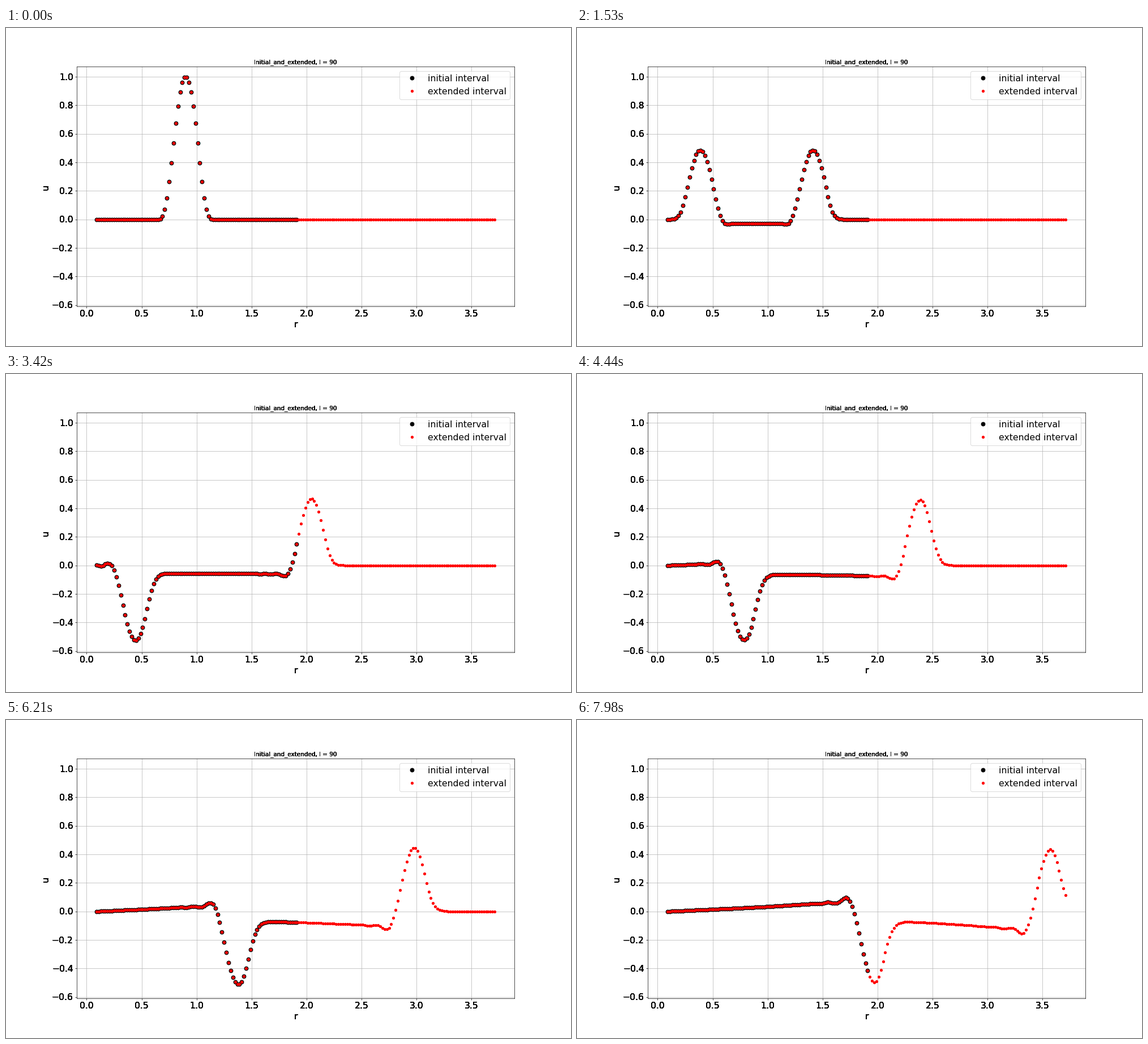
Write a matplotlib script that moves like this. It is 998 px wide and 561 px high and loops after 8 s.

```python
import numpy as np
import matplotlib.pyplot as plt
from matplotlib.animation import FuncAnimation

W, H, DPI = 998, 561, 64
K = W / 16 / DPI            # scales point sizes of a 16-inch-wide figure
STEPS, LOOP_MS = 267, 8000
N_INIT, N_EXT = 92, 182     # points on the two intervals
STEP_R, STEP_T = 0.02, 0.01

plt.rcParams.update({
    "font.family": "DejaVu Sans", "font.size": 18 * K,
    "axes.linewidth": 0.8 * K, "grid.linewidth": 0.8 * K,
    "lines.markeredgewidth": K, "patch.linewidth": K,
})


def bump(r, mid=0.9, half=0.3):
    """Smooth pulse that vanishes outside mid +/- half."""
    d2 = (r - mid) ** 2
    gap = half ** 2 - d2
    inside = gap > 1e-9
    return np.where(inside, np.exp(-4 * d2 / np.where(inside, gap, 1)), 0)


def accel(u):
    """Right side of u_tt = u_rr - u."""
    a = np.zeros_like(u)
    a[1:-1] = (u[2:] - 2 * u[1:-1] + u[:-2]) / STEP_R ** 2 - u[1:-1]
    return a


def solve(r):
    """Leapfrog history with u = 0 halfway between the first two points."""
    old = bump(r)
    new = old + STEP_T ** 2 / 2 * accel(old)
    history = [old]
    for _ in range(STEPS - 1):
        new[0] = -new[1]
        history.append(new)
        old, new = new, 2 * new - old + STEP_T ** 2 * accel(new)
    return history


r = 0.09 + STEP_R * np.arange(300)
waves = solve(r)

fig = plt.figure(figsize=(W / DPI, H / DPI), dpi=DPI, facecolor="white")
LEFT, RIGHT, TOP, BOTTOM = 124.75, 898.2, 67.8, 490.8
ax = fig.add_axes([LEFT / W, 1 - BOTTOM / H, (RIGHT - LEFT) / W, (BOTTOM - TOP) / H])
X0, X1, Y0, Y1 = -0.091, 3.891, -0.609, 1.073
ax.set(xlim=(X0, X1), ylim=(Y0, Y1))
ax.set_axisbelow(True)
ax.grid(True, color="#b0b0b0")


def stamp(x, y, text, size=18, **kw):
    """Heavy text: the same string printed several times at a pixel."""
    for _ in range(5):
        fig.text(x / W, 1 - y / H, text, size=size * K, va="baseline", **kw)


x_ticks = np.arange(8) * 0.5
y_ticks = np.arange(-3, 6) * 0.2
ax.set_xticks(x_ticks)
ax.set_yticks(y_ticks)
ax.tick_params(length=3.5 * K, width=0.8 * K, labelbottom=False, labelleft=False)
for v in x_ticks:
    stamp(LEFT + (v - X0) / (X1 - X0) * (RIGHT - LEFT), 509, f"{v:.1f}", ha="center")
for v in y_ticks:
    y = BOTTOM - (v - Y0) / (Y1 - Y0) * (BOTTOM - TOP)
    stamp(118.7, y + 5.7, f"{v:.1f}".replace("-", "\u2212"), ha="right")

stamp(511.5, 63, "Initial_and_extended, I = 90", size=12, ha="center")
stamp(511.5, 528, "r", ha="center")
stamp(75, 280.5, "u", ha="center", rotation=90, rotation_mode="anchor")

inner, = ax.plot([], [], "o", color="black", ms=8 * K, label="initial interval")
outer, = ax.plot([], [], "o", color="red", ms=5 * K, label="extended interval")
ax.legend(loc="upper right")


def draw(i):
    u = waves[i]
    inner.set_data(r[:N_INIT], u[:N_INIT])
    outer.set_data(r[:N_EXT], u[:N_EXT])
    return inner, outer


anim = FuncAnimation(fig, draw, frames=STEPS, init_func=lambda: draw(0),
                     interval=LOOP_MS / STEPS, repeat=True, repeat_delay=0)
plt.show()
```
